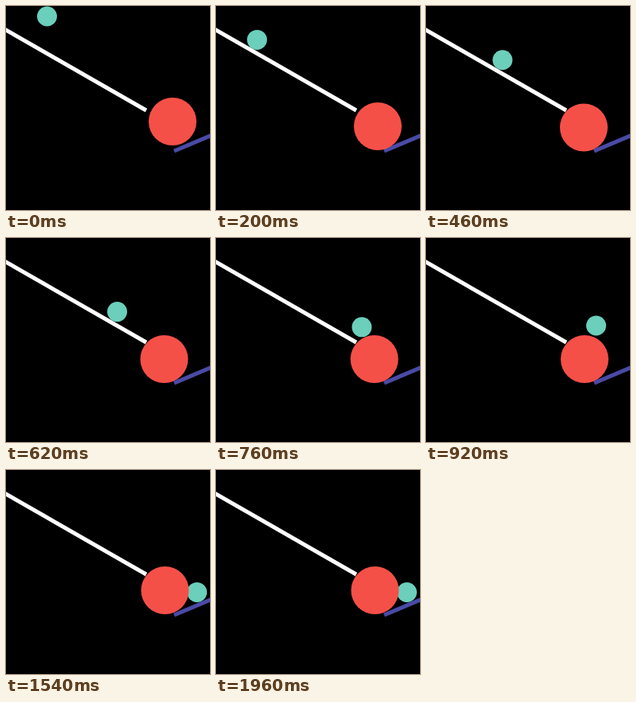
Recreate the animation shown at these times as an HTML page. Size 256 px wide and 256 px high, loop 2000 ms.

```html
<!DOCTYPE html>
<html>
<head>
<meta charset="utf-8">
<style>
html, body { margin: 0; width: 100%; height: 100%; overflow: hidden; background: #000 }
svg { display: block; width: 100vw; height: 100vh }
</style>
</head>
<body>
<svg viewBox="0 0 256 256">
  <path d="M-10 24.3L176 131" stroke="#fff" stroke-width="5"/>
  <path d="M211 182L266 158.8" stroke="#4a4aa6" stroke-width="5"/>
  <circle id="small" r="12.5" fill="#6bcfbb"/>
  <circle id="big" r="30" fill="#f55048"/>
</svg>
<script>
const LOOP = 2000, STEP = 20, G = 1000;
const small = document.getElementById('small'), big = document.getElementById('big');

// time in ms, x, y of the big ball
const bigPath = [
  [0, 209, 145], [40, 209, 147.5], [120, 207.3, 148.7], [200, 203, 151],
  [270, 198, 152.8], [460, 198, 152.5], [620, 198.5, 152],
  [920, 199, 152], [1140, 199.5, 151], [2000, 199.5, 151]
];

function along(path, t) {
  const i = path.findIndex(p => p[0] > t), a = path[i - 1], b = path[i];
  const k = (t - a[0]) / (b[0] - a[0]);
  return [a[1] + (b[1] - a[1]) * k, a[2] + (b[2] - a[2]) * k];
}

const travel = (p, v, a, s) => p + v * s + a * s * s / 2;

function smallAt(t) {
  const since = start => (t - start) / 1000;
  if (t < 200) return [51.5, travel(13, 48, G, since(0))];
  if (t < 734) { // down the white ramp
    const x = travel(51.5, 109, 479, since(200));
    return [x, 42.4 + 0.57 * (x - 51.5)];
  }
  if (t < 1077) // hop over the big ball
    return [travel(178, 191, 0, since(734)), travel(114.5, -117, G, since(734))];
  if (t < 1176) // drop beside the right edge
    return [travel(243.5, -32, 0, since(1077)), travel(133.2, 150, G, since(1077))];
  const x = 239.5 + 0.9 * Math.exp(-since(1176) * 5); // settle on the blue ramp
  return [x, 153.5 - 0.42 * (x - 239.5)];
}

function place(ball, [x, y]) {
  ball.setAttribute('cx', x);
  ball.setAttribute('cy', y);
}

const begin = performance.now();
function draw() {
  const now = (performance.now() - begin) % LOOP;
  const t = Math.min(Math.floor(now / STEP) * STEP, 1960);
  place(small, smallAt(t));
  place(big, along(bigPath, t));
  requestAnimationFrame(draw);
}
draw();
</script>
</body>
</html>
```
